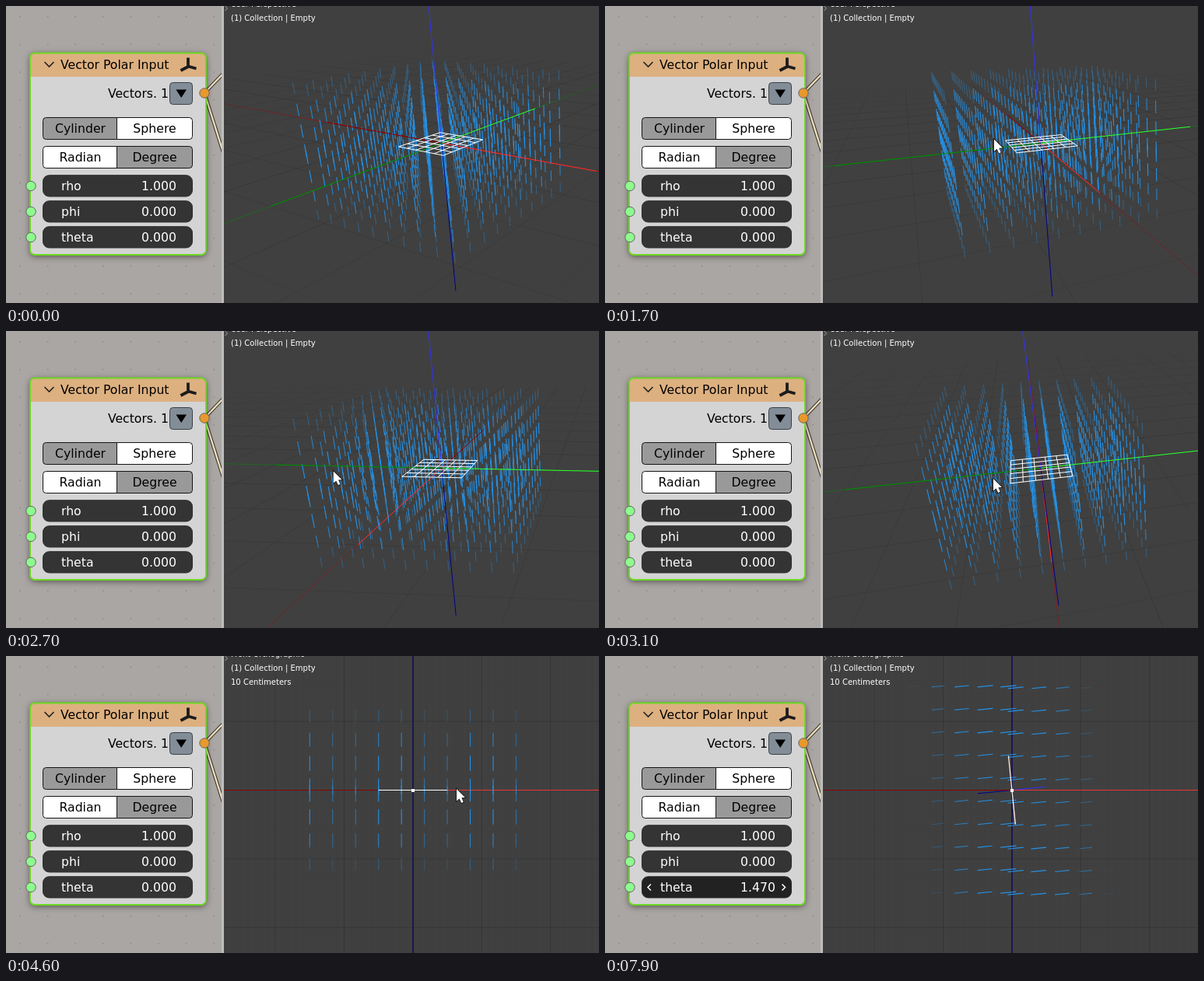
Write an HTML page with a canvas that moves like this. It is 762 px wide and 382 px high and loops after 8 s.

```html
<!DOCTYPE html>
<html lang="en">
<head>
<meta charset="utf-8">
<title>Vector Polar Input</title>
<style>
  html, body { margin: 0; width: 100%; height: 100%; overflow: hidden; background: #404040; }
  canvas { display: block; }
</style>
</head>
<body>
<canvas id="stage" width="762" height="382"></canvas>
<script>
const ctx = document.getElementById('stage').getContext('2d');
const LOOP = 8000, STEP = 100, ORTHO_START = 4100, DRAG_START = 6600;
const FONT = '"DejaVu Sans", sans-serif';

// Keys: time, then values
const VIEW = [[800, -28, 19.2], [1300, -43, 17], [2200, -84.6, 14.5], [2600, -95, 18],
  [3100, -73.5, 25.7], [3700, -14, 20.7], [3900, -12.5, 20.6]];
const POINTER = [[100, 740, 45], [500, 566, 193], [700, 582, 178], [800, 582, 177], [1300, 545, 171],
  [2200, 443, 173], [2600, 415, 178], [3100, 499, 190], [3700, 631, 183], [3900, 634, 184],
  [4500, 634, 184], [4600, 579, 171], [5300, 579, 171], [6200, 104, 303], [6500, 198, 300]];
const THETA = [[6700, 0], [7400, 1.2], [7500, 1.2], [7900, 1.47]];

// Monotone cubic interpolation of column c at time t
function sample(keys, t, c) {
  const last = keys.length - 1;
  if (t <= keys[0][0]) return keys[0][c];
  if (t >= keys[last][0]) return keys[last][c];
  const i = keys.findIndex(k => k[0] > t) - 1;
  const slope = j => (keys[j + 1][c] - keys[j][c]) / (keys[j + 1][0] - keys[j][0]);
  const tangent = j => {
    if (j === 0 || j === last) return 0;
    const a = slope(j - 1), b = slope(j);
    return a * b > 0 ? 2 * a * b / (a + b) : 0;
  };
  const h = keys[i + 1][0] - keys[i][0], u = (t - keys[i][0]) / h;
  const p = keys[i][c], q = keys[i + 1][c], ease = u * u * (3 - 2 * u);
  return p + (q - p) * ease + h * u * (1 - u) * ((1 - u) * tangent(i) - u * tangent(i + 1));
}

function path(points, close) {
  ctx.beginPath();
  points.forEach(([x, y]) => ctx.lineTo(x, y));
  if (close) ctx.closePath();
}

function stroke(points, color, width = 1) {
  path(points);
  ctx.strokeStyle = color;
  ctx.lineWidth = width;
  ctx.stroke();
}

function box(x, y, w, h, radius, fill, line, width = 1) {
  ctx.beginPath();
  ctx.roundRect(x, y, w, h, radius);
  if (fill) { ctx.fillStyle = fill; ctx.fill(); }
  if (line) { ctx.strokeStyle = line; ctx.lineWidth = width; ctx.stroke(); }
}

function label(text, x, y, color = '#000', align = 'left', size = 15.7) {
  ctx.font = `${size}px ${FONT}`;
  ctx.textAlign = align;
  ctx.fillStyle = color;
  ctx.fillText(text, x, y);
}

function socket(x, y, color) {
  ctx.beginPath();
  ctx.arc(x, y, 6.2, 0, 7);
  ctx.fillStyle = color;
  ctx.fill();
  ctx.strokeStyle = '#666';
  ctx.lineWidth = 1;
  ctx.stroke();
}

// ---- 3D viewport ----

function perspectiveLine(azimuth, elevation) {
  const rad = Math.PI / 180;
  const ca = Math.cos(azimuth * rad), sa = Math.sin(azimuth * rad);
  const ce = Math.cos(elevation * rad), se = Math.sin(elevation * rad);
  const NEAR = 0.4;
  const toCamera = ([x, y, z]) => {
    const away = x * sa + y * ca;
    return [x * ca - y * sa - 2.37, 0.32 + z * ce + away * se, 8.55 + away * ce - z * se];
  };
  const toScreen = ([x, y, d]) => [735 + 632 * x / d, 200 - 632 * y / d];
  const clip = (p, q) => {
    if (p[2] >= NEAR) return p;
    const k = (NEAR - p[2]) / (q[2] - p[2]);
    return p.map((v, i) => v + (q[i] - v) * k);
  };
  return (from, to, color, width) => {
    const p = toCamera(from), q = toCamera(to);
    if (p[2] < NEAR && q[2] < NEAR) return;
    stroke([toScreen(clip(p, q)), toScreen(clip(q, p))], color, width);
  };
}

function orthoLine(from, to, color, width) {
  const toScreen = ([x, , z]) => [522.9 + 88.4 * x, 172.5 - 88.4 * z];
  stroke([toScreen(from), toScreen(to)], color, width);
}

// Short strokes on a 10 x 10 x 10 lattice, pointing at the plane and fading away from it
function drawField(line, theta, ortho) {
  const nx = Math.sin(theta), nz = Math.cos(theta);
  const at = i => (i - 4.5) / 3;
  for (let i = 0; i < 10; i++) for (let k = 0; k < 10; k++) {
    const x = at(i), z = at(k), d = x * nx + z * nz;
    let alpha = Math.min(1, 1.25 * (1 - (d / 1.4) ** 2));
    if (alpha <= 0) continue;
    if (ortho && theta < 0.02 && (i % 4 === 1 || i % 4 === 2)) alpha *= 0.6;
    const reach = -Math.sign(d) * (0.23 - 0.04 * d * d);
    for (let j = 0; j < (ortho ? 1 : 10); j++) {
      const y = at(j);
      line([x, y, z], [x + nx * reach, y, z + nz * reach], `rgba(36,146,232,${alpha})`, 1.1);
    }
  }
}

const turn = (theta, [x, y, z]) => {
  const c = Math.cos(theta), s = Math.sin(theta);
  return [x * c + z * s, y, z * c - x * s];
};

function drawAxes(line, theta, size) {
  const axis = (direction, dark, bright) => {
    const tip = turn(theta, direction.map(v => v * size));
    line(tip.map(v => -v), [0, 0, 0], dark);
    line([0, 0, 0], tip, bright);
  };
  axis([1, 0, 0], '#8c0000', '#ff3030');
  axis([0, 1, 0], '#008c00', '#30ff30');
  axis([0, 0, 1], '#00008c', '#3030ff');
}

function drawPlane(line, theta, ortho) {
  const edge = (from, to, width) => line(turn(theta, from), turn(theta, to), '#fff', width);
  if (ortho) return edge([-0.5, 0, 0], [0.5, 0, 0], 1.2);
  for (let i = 0; i <= 5; i++) {
    const v = i / 5 - 0.5;
    edge([v, -0.5, 0], [v, 0.5, 0]);
    edge([-0.5, v, 0], [0.5, v, 0]);
  }
}

function drawOrthoGrid(line) {
  for (let i = -30; i <= 30; i++) {
    const v = i / 10, color = i % 10 ? 'rgba(0,0,0,.025)' : 'rgba(0,0,0,.16)';
    line([v, 0, -3], [v, 0, 3], color);
    line([-3, 0, v], [3, 0, v], color);
  }
}

function drawFloor(line) {
  const REACH = 10;
  for (let i = -REACH; i <= REACH; i++) {
    const fade = 1 - Math.abs(i) / (REACH + 1), color = `rgba(0,0,0,${0.13 * fade})`;
    line([i, -REACH, 0], [i, REACH, 0], color);
    line([-REACH, i, 0], [REACH, i, 0], color);
  }
  for (let i = -REACH; i < REACH; i++) {
    const fade = 1 - Math.abs(i + 0.5) / REACH;
    line([i, 0, 0], [i + 1, 0, 0], `rgba(165,20,24,${fade})`);
    line([0, i, 0], [0, i + 1, 0], `rgba(24,130,24,${fade})`);
  }
}

function drawViewport(t) {
  const ortho = t >= ORTHO_START;
  const theta = Math.round(sample(THETA, t, 1) * 100) / 100;
  const line = ortho ? orthoLine : perspectiveLine(sample(VIEW, t, 1), sample(VIEW, t, 2));
  ctx.save();
  ctx.beginPath();
  ctx.rect(280, 0, 482, 382);
  ctx.clip();
  ctx.fillStyle = '#404040';
  ctx.fillRect(280, 0, 482, 382);

  if (ortho) {
    drawOrthoGrid(line);
    drawAxes(line, theta, 0.5);
    ctx.fillStyle = '#1b174e';
    ctx.fillRect(522, 0, 2, 382);
    line([-3, 0, 0], [0, 0, 0], '#8c0000', 1.2);
    line([0, 0, 0], [3, 0, 0], '#f03434', 1.2);
  } else {
    drawFloor(line);
  }
  drawField(line, theta, ortho);
  if (!ortho) drawAxes(line, theta, 3);
  drawPlane(line, theta, ortho);
  if (ortho) {
    ctx.fillStyle = '#fff';
    ctx.fillRect(521, 171, 4, 4);
  }

  const caption = (text, y) => label(text, 289, y, '#fff', 'left', 10);
  caption(ortho ? 'Front Orthographic' : 'User Perspective', 1);
  caption('(1) Collection | Empty', 19);
  if (ortho) caption('10 Centimeters', 37);
  stroke([[281.5, 0], [284.5, 3], [281.5, 6]], '#aaa');
  ctx.restore();
}

// ---- Node editor ----

function numberField(name, value, y, hovered, dragged) {
  const fill = dragged ? '#222' : hovered ? '#464646' : '#343434';
  box(47.5, y - 13.8, 192, 27.3, 8, fill, '#2e2e2e');
  label(name, 71, y + 5.5, '#fff');
  label(value.toFixed(3), 219, y + 5.5, '#fff', 'right');
  if (hovered || dragged) {
    stroke([[59, y - 4], [55, y], [59, y + 4]], '#fff', 1.5);
    stroke([[227.5, y - 4], [231.5, y], [227.5, y + 4]], '#fff', 1.5);
  }
  socket(32, y, '#8dfb8d');
}

function toggle(y, names, active) {
  names.forEach((name, i) => {
    const radius = i ? [0, 4, 4, 0] : [4, 0, 0, 4];
    box(47.5 + 95 * i, y, i ? 97 : 95, 28, radius, i === active ? '#fff' : '#999', '#141414');
    label(name, 95.5 + 95.5 * i, y + 19.5, '#000', 'center');
  });
}

function drawEditor(t, pointer) {
  ctx.fillStyle = '#aaa6a3';
  ctx.fillRect(0, 0, 277, 382);
  ctx.fillStyle = '#98948f';
  for (let x = 18; x < 277; x += 35.6)
    for (let y = 14; y < 382; y += 35.6) ctx.fillRect(x - 1, y - 1, 2, 2);

  for (const end of [[279, 87], [279, 188]]) {
    stroke([[255, 112], end], '#3a352c', 4.4);
    stroke([[255, 112], end], '#eedfbd', 2.4);
  }
  ctx.fillStyle = '#bdbdbd';
  ctx.fillRect(277, 0, 3, 382);

  ctx.save();
  ctx.shadowColor = 'rgba(0,0,0,.55)';
  ctx.shadowBlur = 9;
  ctx.shadowOffsetY = 2;
  box(31, 60.5, 226, 259.5, 6, '#d4d4d4');
  ctx.restore();
  box(31, 60.5, 226, 30.5, [6, 6, 0, 0], '#ddb080');
  box(31, 60.5, 226, 259.5, 6, null, '#6cd822', 1.8);

  stroke([[49.5, 72], [55.5, 78], [61.5, 72]], '#222', 1.6);
  label('Vector Polar Input', 70, 81);
  stroke([[234, 66.5], [234, 78], [224.5, 83]], '#1c1c1c', 3.8);
  stroke([[234, 77.5], [244.5, 80.5]], '#1c1c1c', 3.8);

  label('Vectors. 1', 209, 118, '#000', 'right');
  box(210.5, 98.5, 29, 28, 4, '#838d98', '#3c4147');
  path([[218.5, 107.5], [232, 107.5], [225.2, 118]], true);
  ctx.fillStyle = '#000';
  ctx.fill();
  socket(255, 112, '#e8982c');

  toggle(143.5, ['Cylinder', 'Sphere'], 1);
  toggle(180.5, ['Radian', 'Degree'], 0);

  const theta = Math.round(sample(THETA, t, 1) * 100) / 100;
  [['rho', 1, 231.5], ['phi', 0, 264.5], ['theta', theta, 297.5]].forEach(([name, value, y]) => {
    const hovered = pointer && overField(pointer) && Math.abs(pointer[1] - y) < 15;
    numberField(name, value, y, hovered, name === 'theta' && t >= DRAG_START);
  });
}

// ---- Pointer ----

const overField = ([x, y]) => x > 47 && x < 240 && y > 217 && y < 312;

function drawPointer(p) {
  const shape = overField(p)
    ? [[-10, 0], [-5, -5], [-5, -1.5], [5, -1.5], [5, -5], [10, 0], [5, 5], [5, 1.5], [-5, 1.5], [-5, 5]]
    : [[0, 0], [0, 15.5], [3.6, 12.4], [6.2, 18], [8.8, 16.8], [6.4, 11.3], [11, 11]];
  path(shape.map(([x, y]) => [p[0] + x, p[1] + y]), true);
  ctx.fillStyle = '#fff';
  ctx.strokeStyle = '#111';
  ctx.lineWidth = 1.6;
  ctx.stroke();
  ctx.fill();
}

function frame(now) {
  const t = Math.floor(now % LOOP / STEP) * STEP;
  const visible = t >= POINTER[0][0] && t < DRAG_START;
  const pointer = visible && [sample(POINTER, t, 1), sample(POINTER, t, 2)];
  drawViewport(t);
  drawEditor(t, pointer);
  if (pointer) drawPointer(pointer);
  requestAnimationFrame(frame);
}
requestAnimationFrame(frame);
</script>
</body>
</html>
```
